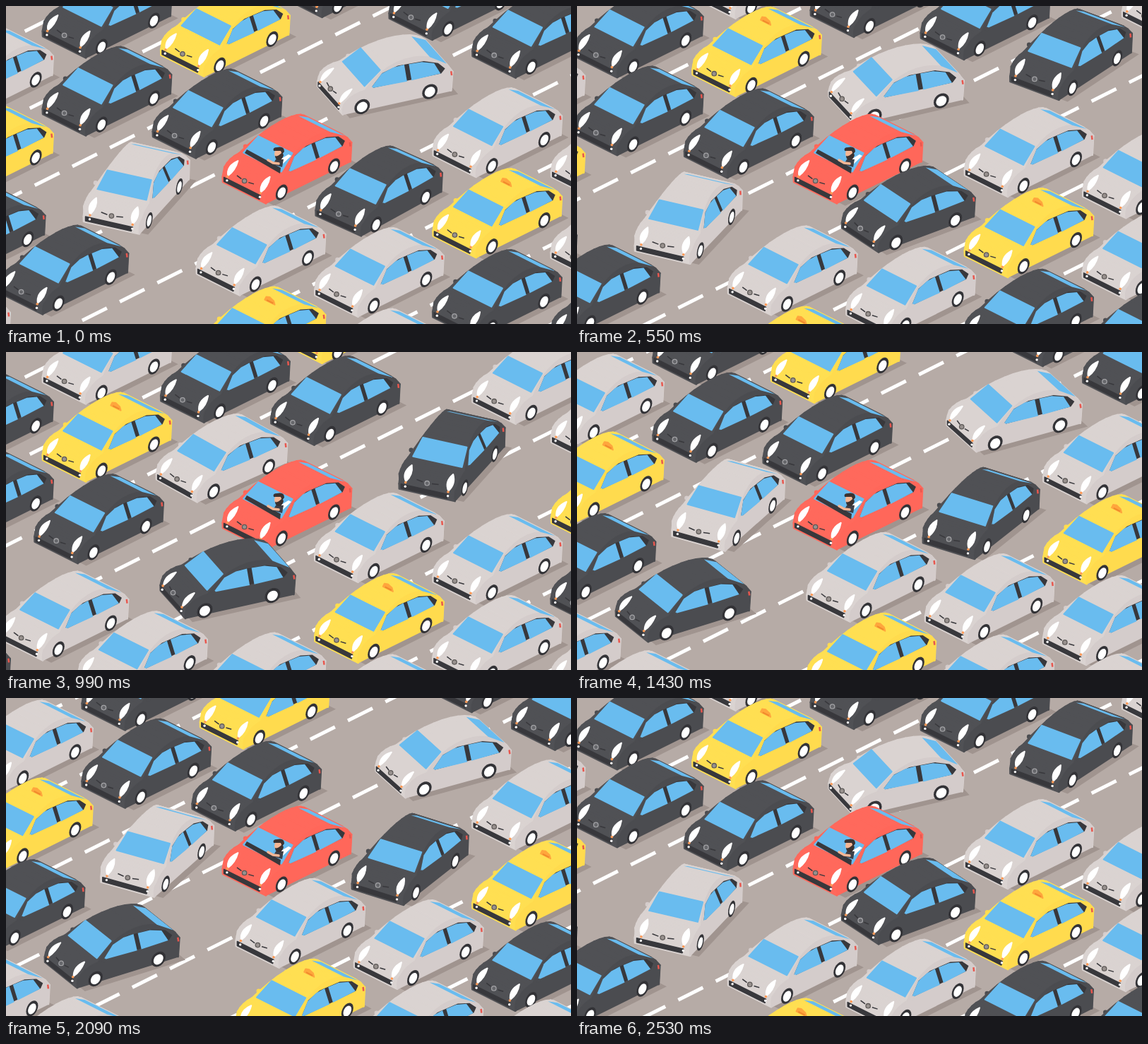
Animation, 800 px wide and 450 px high, one loop 2.64 s. Source, as an HTML page:

```html
<!DOCTYPE html>
<html lang="en">
<head>
<meta charset="utf-8">
<title>Traffic</title>
<style>
  html, body { margin: 0; width: 100%; height: 100%; overflow: hidden; background: #b6aba6; }
  svg { display: block; width: 800px; height: 450px; }
</style>
</head>
<body>
<svg viewBox="0 0 800 450" stroke-linejoin="round">
  <rect width="800" height="450" fill="#b6aba6"/>
  <path id="dashes" stroke="#fff" stroke-width="5" fill="none"/>
  <g id="shadows"></g>
  <g id="cars"></g>
</svg>
<script>
const STEP = 110, STEPS = 24;
const DX = 55.8, DY = -27.9;      // drift of the traffic per step
const GAP = 53.2;                 // distance between lane dashes
const LANE = 112;                 // sideways shift when a car changes lanes
const GLASS = '#69bcef', DARK = '#38383c';

// roof colour, side colour
const PAINT = {
  b: ['#505155', '#4b4c50'],
  g: ['#dad3d1', '#d4cccb'],
  y: ['#ffdf52', '#ffdb4e'],
  r: ['#ff695c', '#ff675a']
};

// lanes: centre of car 0 at step 0, repeating colours ('.' is a free slot)
const LANES = [
  [142, 30, 'bg'], [142, 140, 'by'], [298, 172, 'b.'], [360, 366, 'g.'],
  [360, 480, 'yg'], [527, 511, 'gbgbgggb'], [862, 454, 'bg']
];

// points of a cubic curve
const curve = (a, b, c, d, n) => Array.from({ length: n + 1 }, (_, i) => {
  const t = i / n, u = 1 - t;
  return [0, 1].map(k => u * u * u * a[k] + 3 * u * u * t * b[k] + 3 * u * t * t * c[k] + t * t * t * d[k]);
});

// car outline seen from the side (distance forward, height): tail, roof, hood
const PROFILE = [
  [-83, 3],
  ...curve([-85, 33], [-70, 67], [0, 77], [50, 34], 12),
  ...curve([50, 34], [72, 33], [87, 23], [84, 2], 7)
];

const halfWidth = (f, z) => z > 33 ? 45 - (z - 33) * 0.45 : f > 80 ? 43 : 45;

// projects (forward, sideways, up) to the screen
function projector(yaw) {
  const a = (45 + yaw) * Math.PI / 180, c = Math.cos(a), s = Math.sin(a);
  return (f, w, z) =>
    [w * s - f * c, (f * s + w * c) * 0.5 - z * 0.866].map(v => v.toFixed(1));
}

const path = (d, fill, extra = '') => `<path d="${d}" fill="${fill}" ${extra}/>`;
const outline = (color, width) => `stroke="${color}" stroke-width="${width}"`;

function shadowArt(yaw) {
  const at = projector(yaw);
  const pts = [at(-90, -30, 0), at(-90, 54, 0), at(78, 54, 0), at(78, -30, 0)];
  return path('M' + pts.join('L') + 'Z', '#a0948f');
}

function carArt(kind, yaw) {
  const at = projector(yaw), [top, side] = PAINT[kind];
  const poly = pts => 'M' + pts.map(p => at(...p)).join('L') + 'Z';
  const flank = pts => poly(pts.map(([f, z]) => [f, halfWidth(f, z), z]));
  // pane across the car between two edges
  const pane = (f0, w0, z0, f1, w1, z1) =>
    poly([[f0, -w0, z0], [f0, w0, z0], [f1, w1, z1], [f1, -w1, z1]]);
  const disc = (f, z, r) => poly(Array.from({ length: 20 }, (_, i) =>
    [f + r * Math.cos(i * Math.PI / 10), 45.5, z + r * Math.sin(i * Math.PI / 10)]));
  const spot = (p, r, fill, extra = '') => {
    const [x, y] = at(...p);
    return `<circle cx="${x}" cy="${y}" r="${r}" fill="${fill}" ${extra}/>`;
  };
  let art = spot([36, -46, 39], 3.2, side);

  // shell
  for (let i = 1; i < PROFILE.length; i++) {
    const [f0, z0] = PROFILE[i - 1], [f1, z1] = PROFILE[i];
    art += path(pane(f0, halfWidth(f0, z0), z0, f1, halfWidth(f1, z1), z1), top, outline(top, 3));
  }
  art += path(flank(PROFILE), side, outline(side, 2));

  // glass
  art += path(pane(-56, 32, 57, -80, 37, 43), GLASS);
  art += path(pane(48, 38, 37, 22, 34, 55), GLASS, outline(GLASS, 2));
  art += path(flank([[41, 35], [20, 51], [-5, 56], [-45, 54.5], [-66, 48], [-75, 39], [-68, 34]]), DARK);
  art += path(flank([[41, 35], [21, 50.5], [2, 55], [-15, 55.5], [-15, 33.5]]), GLASS);
  art += path(flank([[-22, 33.5], [-22, 55], [-42, 54], [-60, 49], [-67, 34]]), GLASS);

  // wheels
  for (const f of [55, -50])
    art += path(disc(f, 9, 12), '#333337') + path(disc(f, 8.5, 8.2), '#fff');

  // front
  art += path(poly([[85, -40, 4], [85, 31, 4], [85, 33, 11], [85, -40, 11]]),
    DARK, outline(DARK, 1.5));
  for (const k of [-1, 1]) {
    const low = at(84, 33 * k, 16), high = at(65, 32 * k, 33);
    const bulge = d => at(78, 33 * k + d, 26);
    art += path(`M${low}Q${bulge(-9)} ${high}Q${bulge(9)} ${low}Z`, '#fff', outline('#fff', 2));
    art += spot([85, 33 * k, 15], 1.8, '#ff9a56');
    art += spot([86, 33 * k, 9], 1.7, '#fff');
    art += path(`M${at(83, 7 * k, 21)}L${at(82, 17 * k, 22)}`, 'none', outline(DARK, 1.5));
  }
  art += spot([84, 0, 21], 3.2, kind === 'b' ? '#66676b' : '#98918e',
    outline(kind === 'b' ? '#a3a3a6' : '#5d5957', 1.3));

  // mirror, tail light
  art += spot([42, 47, 36], 3, side);
  art += path(`M${at(-84, 43, 33)}L${at(-85, 43, 26)}`, 'none', outline('#e8574e', 2.5));

  if (kind === 'y')
    art += path(poly([[-21, -12, 61], [-21, 8, 61], [-21, 6, 66], [-21, -2, 69], [-21, -9, 67]]),
      '#ffa63d', outline('#ffa63d', 2)) +
      path(`M${at(-21, -8, 62)}L${at(-21, 5, 62)}`, 'none', outline('#f08a2c', 2));
  return art + (kind === 'r' ? driver() : '');
}

function driver() {
  return `<g transform="translate(-397 -236)">
    <path d="M338 208L341 203L389 229L388 237Z" fill="${DARK}"/>
    <path d="M389 226L404 212L400 210L388 217Z" fill="#fff"/>
    <path d="M378 224L382 217L393 217L391 228Z" fill="#3d3f47"/>
    <path d="M371 218L378 222L386 223" fill="none" stroke="#f5b795" stroke-width="3.5" stroke-linecap="round"/>
    <ellipse cx="386" cy="209" rx="6" ry="7" fill="#f5b795"/>
    <path d="M381 212Q385 214 391 207L393 211Q391 219 385 218Q381 217 381 212Z" fill="#3b3230"/>
    <path d="M379 205Q377 200 384 200Q394 198 394 206L391 210L389 205Z" fill="#3b3230"/>
  </g>`;
}

const cache = {};
const cached = (key, make) => cache[key] || (cache[key] = make());

// a car that swerves one lane aside (dir -1 or 1) and back within 12 steps
function swerve(kind, i, dir) {
  const phase = Math.min(Math.max(i + 0.3, 0), 12) * Math.PI / 12;
  const shift = i > 0 ? dir * LANE * Math.sin(phase) ** 2 : 0;
  const yaw = i > 0 ? -dir * 21 * Math.sin(2 * phase) : 0;
  return { kind, x: 81 + DX * i + shift, y: 393 + DY * i + shift / 2, yaw: Math.round(yaw) };
}

function traffic(n) {
  const list = [{ kind: 'r', x: 397, y: 236, yaw: 0 }];
  for (const [x, y, kinds] of LANES)
    for (let m = -14; m < 9; m++) {
      const kind = kinds[(m + 16) % kinds.length], d = 3 * m + n;
      if (kind !== '.') list.push({ kind, x: x + DX * d, y: y + DY * d, yaw: 0 });
    }
  for (let i = n % 6 - 6; i < 18; i += 6)
    list.push(swerve('b', i, 1), swerve('g', i + 3, -1));
  return list
    .filter(c => c.x > -110 && c.x < 910 && c.y > -60 && c.y < 550)
    .sort((a, b) => a.y - b.y);
}

function dashes(n) {
  let d = '';
  for (let k = 0; k < 8; k++) {
    const c = 49 + 112.5 * k;
    for (let i = -2; i < 17; i++) {
      const x = -9 + 7 * k + GAP * (i + n * 4 / 3 % 1);
      d += `M${x - 17.5} ${c - (x - 17.5) / 2}L${x + 17.5} ${c - (x + 17.5) / 2}`;
    }
  }
  return d;
}

const el = id => document.getElementById(id);
const put = (car, art) =>
  `<g transform="translate(${car.x.toFixed(1)} ${car.y.toFixed(1)})">${art}</g>`;

function draw(n) {
  const list = traffic(n);
  el('dashes').setAttribute('d', dashes(n));
  el('shadows').innerHTML = list.map(c =>
    put(c, cached('s' + c.yaw, () => shadowArt(c.yaw)))).join('');
  el('cars').innerHTML = list.map(c =>
    put(c, cached(c.kind + c.yaw, () => carArt(c.kind, c.yaw)))).join('');
}

let shown = -1;
const start = performance.now();
function tick() {
  const n = Math.floor((performance.now() - start) / STEP) % STEPS;
  if (n !== shown) draw(shown = n);
  requestAnimationFrame(tick);
}
tick();
</script>
</body>
</html>
```
